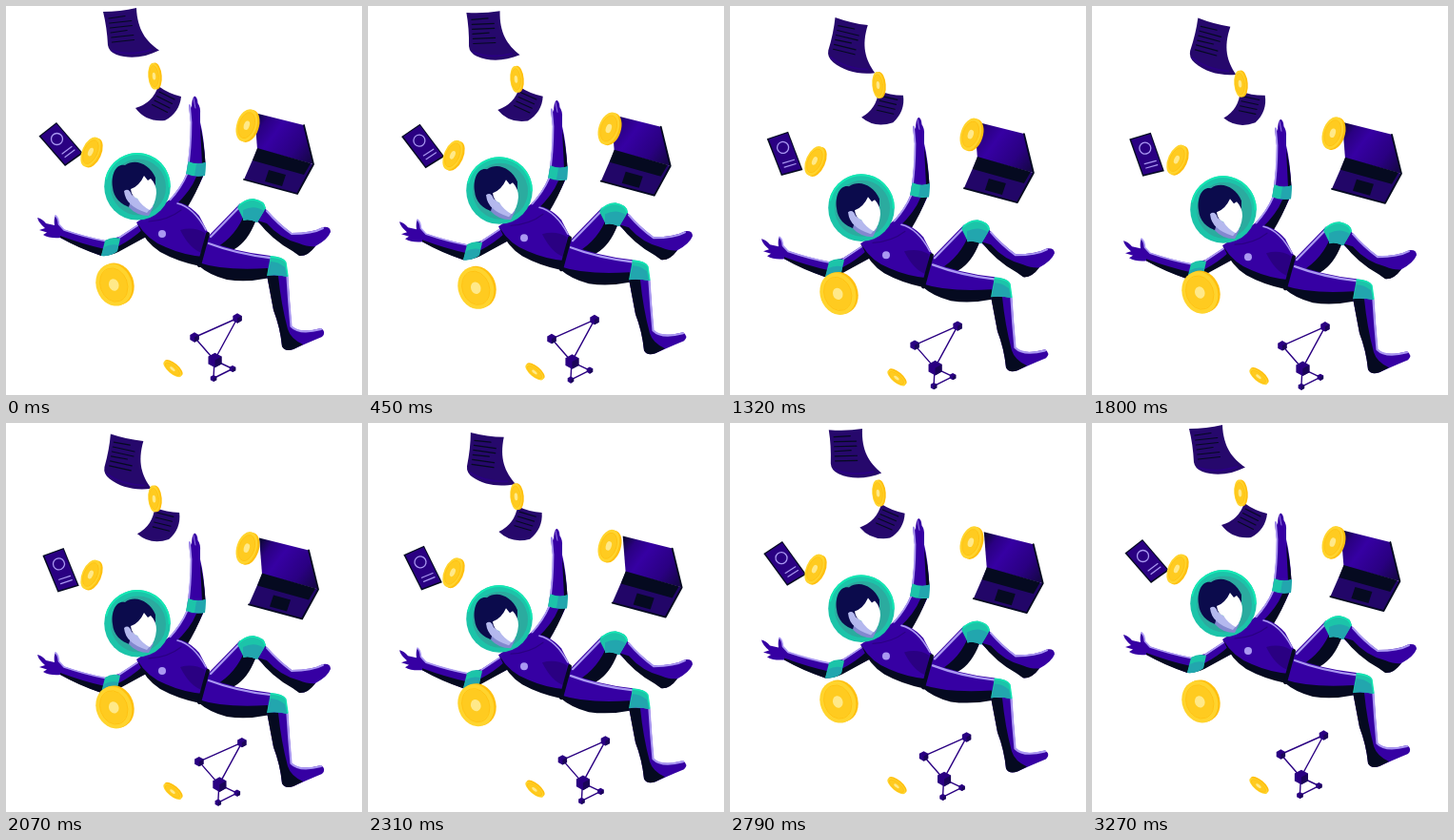
An HTML page with a canvas that plays this animation: 374 px wide and 408 px high, repeating every 3.3 s.

```html
<!DOCTYPE html>
<html lang="en">
<head>
<meta charset="utf-8">
<title>Floating astronaut</title>
<style>
html, body { margin: 0; width: 100%; height: 100%; overflow: hidden; background: #fff; }
canvas { display: block; width: 374px; height: 408px; }
</style>
</head>
<body>
<canvas id="stage" width="374" height="408"></canvas>
<script>
const ctx = document.getElementById('stage').getContext('2d');
const LOOP = 3300, STEP = 30, TAU = Math.PI * 2;
const C = {
  suit: '#3600a3', deep: '#2a0082', page: '#26086c', dark: '#050a20', glow: '#aa98f2',
  teal: '#1cc4a9', mint: '#14e8b4', band: '#22a6ae', visor: '#2bab9f',
  hair: '#0b0b4c', skin: '#b4b8ee', neck: '#8288cf',
  gold: '#ffd42e', rim: '#ffc010', pale: '#ffe98a'
};

function fill(d, color) {
  ctx.fillStyle = color;
  ctx.fill(new Path2D(d));
}

function line(d, color, width = 1) {
  ctx.strokeStyle = color;
  ctx.lineWidth = width;
  ctx.stroke(new Path2D(d));
}

function oval(x, y, rx, ry, color, turn = 0) {
  ctx.fillStyle = color;
  ctx.beginPath();
  ctx.ellipse(x, y, rx, ry, turn, 0, TAU);
  ctx.fill();
}

function ring(x, y, rx, ry, color, width, from = 0, to = TAU) {
  ctx.strokeStyle = color;
  ctx.lineWidth = width;
  ctx.beginPath();
  ctx.ellipse(x, y, rx, ry, 0, from, to);
  ctx.stroke();
}

// Draws inside a frame shifted by (dx, dy) and turned about (cx, cy).
function place(dx, dy, draw, deg = 0, cx = 0, cy = 0) {
  ctx.save();
  ctx.translate(cx + dx, cy + dy);
  ctx.rotate(deg * Math.PI / 180);
  ctx.translate(-cx, -cy);
  draw();
  ctx.restore();
}

function coin(x, y, rx, ry, deg, edge) {
  place(x, y, () => {
    oval(edge, 0, rx, ry, C.rim);
    oval(-edge, 0, rx, ry, C.gold);
    oval(-edge, 0, rx * 0.75, ry * 0.77, '#ffcb20');
    ring(-edge, 0, rx * 0.77, ry * 0.8, C.rim, 0.8);
    oval(-edge, 0, rx * 0.28, ry * 0.28, C.pale);
  }, deg);
}

function bigPage() {
  fill('M102 6Q120 6 137 2C138 25 147 37 161 46.5C146 54 130 56 116 51Q108 48 107 41Q106 22 102 6Z', C.page);
  line('M112 47Q130 53 152 46', C.deep, 2);
  for (let i = 0; i < 6; i++) {
    const y = 13 + i * 5, x = 108 + i * 0.7;
    line(`M${x} ${y}L${x + (i % 3 ? 23 : 17)} ${y - 2.5}`, C.dark, 1.2);
  }
}

function smallPage() {
  fill('M160 84Q171 92 184 95C183 106 177 115 167 120Q147 122 136 107Q154 102 160 84Z', C.page);
  for (let i = 0; i < 4; i++) {
    line(`M${161 - i * 2.5} ${90 + i * 4.5}l16 8`, C.dark, 1.1);
  }
}

function phone() {
  fill('M34.5 136.5L53 122L81 154.5L62 168Z', C.dark);
  fill('M36.5 136.5L53 123.5L79 154L62 166Z', C.deep);
  ring(53.5, 139.5, 6, 6, C.glow, 1.3);
  line('M59 155L69 147.5M62 158.5L72 151', C.glow, 1.2);
}

function laptop() {
  const lid = ctx.createLinearGradient(260, 112, 322, 158);
  lid.addColorStop(0, C.dark);
  lid.addColorStop(0.2, C.deep);
  lid.addColorStop(0.4, C.suit);
  lid.addColorStop(0.75, C.deep);
  lid.addColorStop(1, '#17064c');
  fill('M261 112L313 125L323 166L264 150Z', lid);
  fill('M264 150L323 166L306 197L250 182Z', '#220668');
  fill('M264 149L320 165L313 177L259 162Z', C.dark);
  fill('M276 172L294 177L290 189L272 184Z', C.dark);
  line('M250 182L306 197L323 166L313 125', C.dark, 1.8);
}

function cube(x, y, r) {
  const w = r * 0.9, h = r / 2;
  fill(`M${x} ${y - r}l${w} ${h}v${r}l${-w} ${h}l${-w} ${-h}v${-r}Z`, C.deep);
  fill(`M${x} ${y}l${w} ${-h}v${r}l${-w} ${h}Z`, '#1a0458');
}

function network() {
  line('M219 371.5L198 347.5L243 327.5L219 371.5L238 380.5L218 390.5Z', C.deep, 1.4);
  cube(198, 347.5, 5.2);
  cube(243, 327.5, 5.2);
  cube(219.5, 371.5, 7.8);
  cube(238, 380.5, 3.6);
  cube(218, 390.5, 3.6);
}

function legs() {
  // far leg
  fill('M211 243L246 207L262 226Q253 246 240 254L212 260Z', C.suit);
  fill('M214 257Q238 246 249 222L262 226Q254 247 240 255L220 262Z', C.dark);
  line('M215 242L246 210', C.glow, 2.2);
  fill('M271 211Q285 227 300 238Q322 238 333 232Q341 231 341 237Q338 245 325 252Q317 262 309 262L302 257Q281 243 264 226Z', C.suit);
  fill('M264 225L274 228Q288 244 308 249Q318 253 325 252Q317 263 308 262L301 257Q279 245 264 225Z', C.dark);
  line('M274 215Q286 229 300 239Q322 239 333 233', C.glow, 2);
  fill('M243 211Q250 202 260 202Q272 204 273 212L264 227Q255 223 250 225Z', C.teal);
  fill('M249 214Q261 208 271 215L264 227Q256 223 249 225Z', C.band);
  line('M245 209Q252 203 260 203Q271 205 272 212', C.mint, 1.5);

  // near leg
  fill('M209 245Q240 258 278 262L276 284Q256 288 233 286Q215 281 202 272Z', C.suit);
  fill('M202 269Q229 278 275 275L275 285.5Q253 290 232 287Q213 282 202 272Z', C.dark);
  line('M213 249Q242 260 277 264', C.glow, 2.3);
  fill('M274 282H296Q298 310 300 336Q308 344 331 338Q337 342 332 347Q315 354 302 360Q293 363 290 357Q288 337 281 319Z', C.suit);
  fill('M274 282L286 283Q289 313 296 339Q299 349 312 355L302 360Q293 363 290 357Q288 337 281 319Z', C.dark);
  line('M295.5 284Q297 310 299.5 336Q308 345 331 339', C.glow, 2.2);
  fill('M278 262Q291 263 294 268L296 284Q283 281 274 283Z', C.teal);
  fill('M278 268Q286 268 293 274L295 284Q283 281 275 283Z', C.band);
  line('M278 263Q291 264 294 269L296 283', C.mint, 1.3);
}

function arms() {
  // raised arm
  fill('M194 122L192 104Q194 103 195 107Q195 97 198 94.5Q201 95 201.5 102Q204.5 106 204 113L204 122Q208 138 209.5 165L207 179Q200 194 190 212L168 207Q184 191 189.5 176Q194 148 194 122Z', C.suit);
  fill('M204 126Q208 143 209.5 165L206 166Q205 145 204 126Z', C.dark);
  fill('M207 178Q200 196 190 212L178 209Q194 194 200 179Z', C.dark);
  line('M193 104L194.5 122Q194.5 148 190.5 176Q184 191 172 204', C.glow, 1.8);
  line('M197 97L199 107', C.glow, 0.8);
  fill('M191.5 163Q201 167 210 164L209 178Q198 180 189 176Z', C.teal);
  fill('M200 166L210 164L209 178L198 178Z', C.band);

  // outstretched arm
  fill('M33 222Q38 223 42 228L51 230Q50 223 52 219.5Q55 222 55.5 229L61 234.5Q83 242 104 246L119 242L142 227L149 241L118 257Q110 262 100 262Q76 253 57 243Q46 244 39 240L43 237.5L35 235L41 233Q34 227 33 222Z', C.suit);
  fill('M57 241Q81 250 104 255L118 252Q132 245 145 233L149 241L118 258Q110 262 100 262Q76 254 57 243Z', C.dark);
  line('M52 220Q55 222 55.5 229L61 235Q83 242.5 104 246.5M119 243L140 229', C.glow, 1.7);
  fill('M104 246Q112 241 120 244L117 257Q110 263 100 262Z', C.teal);
  fill('M103 253Q110 249 118 251L117 257Q110 263 100 262Z', C.band);
}

function torso() {
  fill('M137 227L171 204Q190 205 203 220L213 239L204 272Q181 267 162 257Q147 247 137 227Z', C.suit);
  fill('M138 228Q149 246 168 253Q186 261 207 263L204 273Q180 268 162 258Q146 248 138 228Z', C.dark);
  fill('M183 235Q197 231 209 238L206 259Q193 255 183 235Z', C.deep);
  line('M180 207Q197 211 210 235', C.glow, 1.6);
  line('M150 226Q170 225 184 214', C.deep, 1.2);
  line('M212 239L203 272', C.dark, 4);
  oval(164, 239, 4, 4, C.glow);
}

function head() {
  oval(138, 189.3, 34.8, 35.3, C.teal);
  oval(139, 190, 29, 29.5, C.visor);
  fill('M112 190C110 176 116 165 125 167C136 159 151 166 157 180L157 190L146 186L136 198L132 212C120 208 113 201 112 190Z', C.hair);
  fill('M132 200L155 210L150 220Q137 220 129 211Z', C.neck);
  fill('M124 194Q129 190 132 198L139 203Q146 211 153 211L148 217Q136 213 131 208Q125 203 124 194Z', C.skin);
  fill('M131 192Q140 189 145 178L149 183L152 181Q158 187 158 196Q157 208 151 214Q143 210 138 202Q132 200 131 192Z', '#fff');
  ring(138, 189.3, 33.8, 34.3, C.mint, 2, -2.9, 0);
}

function astronaut() {
  arms();
  legs();
  torso();
  head();
}

function render(ms) {
  const a = ms / LOOP * TAU;
  const rise = (1 - Math.cos(a)) / 2;
  const sway = -Math.sin(a);
  const bob = 5 + 5 * Math.cos(a - 1400 / LOOP * TAU);

  ctx.fillStyle = '#fff';
  ctx.fillRect(0, 0, 374, 408);
  ctx.lineCap = ctx.lineJoin = 'round';

  place(0, 16 * rise, bigPage, 22 * rise, 130.5, 26);
  place(0, 4.5 * rise, smallPage, -15 * rise, 161, 101);
  place(0, 11 * rise, phone, 22 * rise, 57.5, 145);
  place(7 * sway, 10 * rise, laptop);
  place(6.7 * sway, 9 * rise, network);
  place(0, 24.7 * rise, astronaut);

  coin(156.5, 73 + bob, 6.2, 14, -5, 1);
  coin(90, 153 + bob, 9, 16.5, 24, 1.2);
  coin(254, 125 + bob, 10.5, 17.5, 18, 1.2);
  coin(114.5, 291.5 + bob, 18.5, 22.5, -20, 1.3);
  coin(175.5, 379.5 + bob, 4.8, 11.8, -50, 0.9);
}

function tick(now) {
  render(Math.floor(now % LOOP / STEP) * STEP);
  requestAnimationFrame(tick);
}

render(0);
requestAnimationFrame(tick);
</script>
</body>
</html>
```
